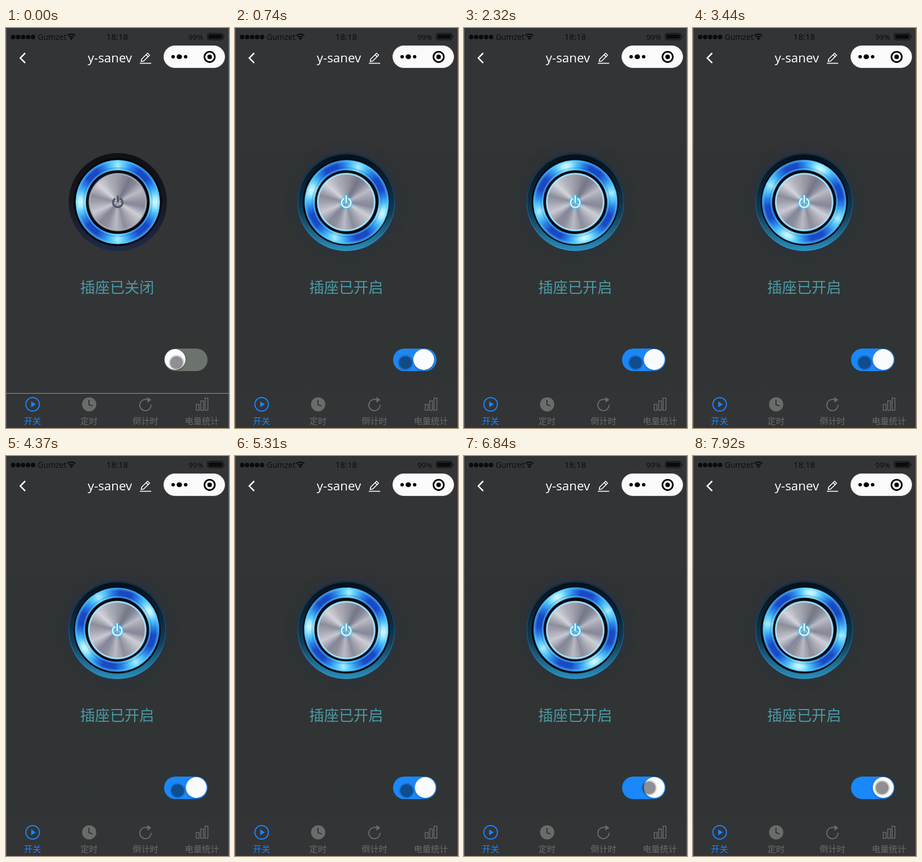
An HTML page that plays this animation: 395x710 px, repeating every 8 s.

```html
<!DOCTYPE html>
<html lang="zh">
<head>
<meta charset="utf-8">
<title>插座开关</title>
<style>
html, body { margin: 0; width: 100%; height: 100%; overflow: hidden; background: #333436; }
.stage { position: absolute; left: 0; top: 0; width: 395px; height: 710px; overflow: hidden; background: #333436; }
.stage > * { position: absolute; }
svg { left: 0; top: 0; }
svg text { font-family: "Open Sans", "Noto Sans CJK SC", "Noto Sans CJK", sans-serif; }
.cjk text { font-family: "Noto Sans CJK SC", "Noto Sans CJK", sans-serif; text-anchor: middle; font-weight: 300; }

.on, .off, .ring, .knob, .track, .pointer {
  animation: 8s linear infinite;
}
.on { animation-name: show; }
.off { animation-name: hide; }
@keyframes show { 0%, 7.74% { opacity: 0 } 7.75%, 100% { opacity: 1 } }
@keyframes hide { 0%, 7.74% { opacity: 1 } 7.75%, 100% { opacity: 0 } }

.tint {
  left: 1px; top: 200px; width: 393px; height: 449px;
  background: linear-gradient(#30343400, #303434 40px, #303434 400px, #30343433);
}

/* Round parts are placed by centre and radius. */
.disc {
  left: calc((var(--x) - var(--r)) * 1px);
  top: calc((var(--y) - var(--r)) * 1px);
  width: calc(var(--r) * 2px);
  height: calc(var(--r) * 2px);
  border-radius: 50%;
}
.off.disc { --x: 198; --y: 309; }
.on.disc { --x: 197; --y: 308.7; }
.shell { --r: 87; }
.shell.off { background: radial-gradient(#050608 77px, transparent 79px), linear-gradient(#0f1014, #15171f 45%, #1f2a48); }
.shell.on {
  background:
    radial-gradient(#02060c 76px, transparent 78px),
    radial-gradient(transparent 84px, #3c9cc855 86px, transparent 87px),
    linear-gradient(#04101c, #0a2133 30%, #123d58 62%, #2a8fbc);
  box-shadow: 0 0 18px 3px #29304a90;
}
.ring {
  --x: 198; --y: 309; --r: 75;
  transform-origin: 74.5px 74.5px;
  background:
    radial-gradient(circle, transparent 56.5px, #5fd0ffa0 58px, #2f9cf050 60px, #0a2a8c40 61px, transparent 62.5px,
      transparent 69px, #4cc4ff60 71.5px, #66d4ff90 73.5px, #1a6cb0 75px),
    repeating-conic-gradient(#a4ecff 0deg, #50c3f8 11deg, #2a80e6 22deg, #1a49c6 34deg,
      #1a49c6 52deg, #2a80e6 63deg, #50c3f8 74deg, #a4ecff 83deg, #ccf8ff 90deg, #a4ecff 97deg,
      #50c3f8 106deg, #2a80e6 117deg, #1a49c6 128deg, #1a49c6 146deg, #2a80e6 158deg, #50c3f8 169deg, #a4ecff 180deg);
  -webkit-mask: radial-gradient(circle, transparent 56px, #000 57px);
  mask: radial-gradient(circle, transparent 56px, #000 57px);
  animation-name: spin;
}
@keyframes spin {
  0%, 7.74% { transform: rotate(0deg) }
  7.75% { transform: rotate(14deg) }
  100% { transform: rotate(282deg) }
}
.well { --r: 58; background: #04070d; }
.cap {
  --r: 52;
  background:
    radial-gradient(circle, transparent 48px, var(--rim) 50px, var(--edge) 52px),
    repeating-radial-gradient(circle, #ffffff0c 0 1px, #2022300c 1.5px 2.5px, #ffffff0c 3px),
    conic-gradient(#9a9ca8, #747685 28deg, #85879a 42deg, #bcbdc7 62deg, #9a9ba8 82deg, #85879a 100deg,
      #d0d1d9 122deg, #a6a7b2 146deg, #8b8d9b 164deg, #bcbdc7 184deg, #8d8f9c 206deg,
      #85879a 222deg, #cbccd5 246deg, #a9aab5 266deg, #8b8d9a 284deg, #d6d7df 312deg, #b0b1bb 336deg, #9a9ca8);
}
.cap.off { --rim: #aeb2be; --edge: #4b505e; }
.cap.on { --rim: #b8e6fa; --edge: #4ab4e8; }

.track {
  left: 280px; top: 569px; width: 77px; height: 40px; border-radius: 20px;
  animation-name: track;
}
@keyframes track { 0%, 6.25% { background: #6c726c } 9.5%, 100% { background: #1a88fa } }
.knob {
  --x: 299.5; --y: 588.5; --r: 18.7;
  background: #fafbfd; box-shadow: 0 1px 3px #0006;
  animation-name: slide;
}
@keyframes slide {
  0%, 6.25% { transform: none; animation-timing-function: ease }
  10.75%, 100% { transform: translateX(37.5px) }
}
.pointer {
  --x: 302; --y: 594; --r: 14;
  background: radial-gradient(circle, #0000006e 10.5px, #00000038 11.5px, #00000024 13px, transparent 14px);
  animation-name: point;
}
@keyframes point {
  0%, 12.9% { transform: none }
  17.3%, 76.1% { transform: translate(2px, 0) }
  83.6%, 87.4% { transform: translate(26px, -5px) }
  91.9%, 100% { transform: translate(33px, -5px) }
}
</style>
</head>
<body>
<div class="stage">
  <div class="tint on"></div>

  <div class="disc shell off"></div>
  <div class="disc shell on"></div>
  <div class="disc well off"></div>
  <div class="disc well on"></div>
  <div class="disc ring"></div>
  <div class="disc cap off"></div>
  <div class="disc cap on"></div>

  <div class="track"></div>
  <div class="disc knob"></div>
  <div class="disc pointer"></div>

  <svg width="395" height="710" viewBox="0 0 395 710" fill="none">
    <defs>
      <path id="power" d="M193.6 302.6A8.3 8.3 0 1 0 202.4 302.6M198 297.5V309.5"/>
      <filter id="glow" x="-60%" y="-60%" width="220%" height="220%"><feGaussianBlur stdDeviation="2"/></filter>
    </defs>

    <!-- power symbol -->
    <g class="off" stroke="#4c5668" stroke-width="3.4">
      <use href="#power"/>
    </g>
    <g class="on" stroke-linecap="round">
      <g transform="translate(-1 .5)">
        <use href="#power" stroke="#38bdf8" stroke-width="4" filter="url(#glow)"/>
        <use href="#power" stroke="#5fd0f8" stroke-width="3.4"/>
        <use href="#power" stroke="#e4fbff" stroke-width="2"/>
      </g>
    </g>

    <!-- status bar -->
    <g fill="#0b0b0c">
      <path d="M12.7 16h.01M21.5 16h.01M30.3 16h.01M39.1 16h.01M47.9 16h.01" stroke="#0b0b0c" stroke-width="8" stroke-linecap="round"/>
      <text x="56" y="20.5" font-size="14">Gumzet</text>
      <g stroke="#0b0b0c" stroke-width="2" fill="none">
        <path d="M108.8 13.6A10 10 0 0 1 122.8 13.6M111.5 16.4A6.2 6.2 0 0 1 120.1 16.4"/>
      </g>
      <path d="M115.8 21.2L112.9 18.3A4 4 0 0 1 118.7 18.3Z"/>
      <text x="197" y="21" font-size="15" text-anchor="middle">18:18</text>
      <text x="323" y="20.5" font-size="13.3">99%</text>
      <rect x="356.5" y="9.5" width="28" height="11.5" rx="2.5" stroke="#0b0b0c" fill="none"/>
      <rect x="358.3" y="11.3" width="24.4" height="8" rx="1"/>
      <path d="M385.8 13Q388.5 15.2 385.8 17.6Z"/>
    </g>

    <!-- title bar -->
    <path d="M34 44.5L25.3 53.3L34 62" stroke="#fff" stroke-width="2.5"/>
    <text x="184" y="61" font-size="22.4" font-weight="500" fill="#fff" text-anchor="middle">y-sanev</text>
    <g stroke="#fff" stroke-width="1.6" stroke-linejoin="round">
      <path d="M239.5 59.5L240.3 55.2L250.8 44.7L254.4 48.3L243.8 58.8ZM248.2 47.4L251.7 50.9"/>
      <path d="M237 62.6H257.2"/>
    </g>
    <rect x="279.5" y="31.5" width="108" height="39" rx="19.5" fill="#fafafa" stroke="#dcdcdc"/>
    <g fill="#000">
      <circle cx="296" cy="51" r="3.1"/>
      <ellipse cx="307" cy="51" rx="4.8" ry="4.3"/>
      <circle cx="318.2" cy="51" r="3.1"/>
      <circle cx="360.7" cy="51.3" r="4"/>
      <circle cx="360.7" cy="51.3" r="9.2" stroke="#000" stroke-width="2.9" fill="none"/>
    </g>

    <!-- state caption -->
    <g class="cjk" font-size="26.2" fill="#4c99a4">
      <text class="off" x="197" y="469.7">插座已关闭</text>
      <text class="on" x="197" y="469.7">插座已开启</text>
    </g>

    <!-- tabs -->
    <path class="off" d="M1 648.5H394" stroke="#97989a"/>
    <g stroke="#1a86ff" stroke-width="1.9">
      <circle cx="47.2" cy="668" r="12"/>
      <path d="M44.7 662.8L52.7 668L44.7 673.2Z" fill="#1a86ff" stroke="none"/>
    </g>
    <circle cx="147.3" cy="668" r="12.6" fill="#6a6c6a"/>
    <path d="M147 660V668.7L153.5 671" stroke="#2d2f30" stroke-width="1.8"/>
    <path d="M257 668.8A10 10 0 1 1 247.5 659.2H252" stroke="#6a6c6a" stroke-width="1.9"/>
    <path d="M250.5 655L257.5 660L250.5 665Z" fill="#6a6c6a"/>
    <g stroke="#6f7376" stroke-width="1.3">
      <rect x="337" y="668.2" width="5" height="10.3"/>
      <rect x="344.8" y="662" width="5" height="16.5"/>
      <rect x="352.6" y="657" width="5" height="21.5"/>
    </g>
    <g class="cjk" font-size="15.2" fill="#6a6c6a">
      <text x="47" y="703.4" fill="#1a86ff">开关</text>
      <text x="147" y="703.4">定时</text>
      <text x="247" y="703.4">倒计时</text>
      <text x="347" y="703.4">电量统计</text>
    </g>

    <path d="M.5 0V710M394.5 0V710" stroke="#606163"/>
  </svg>
</div>
</body>
</html>
```
